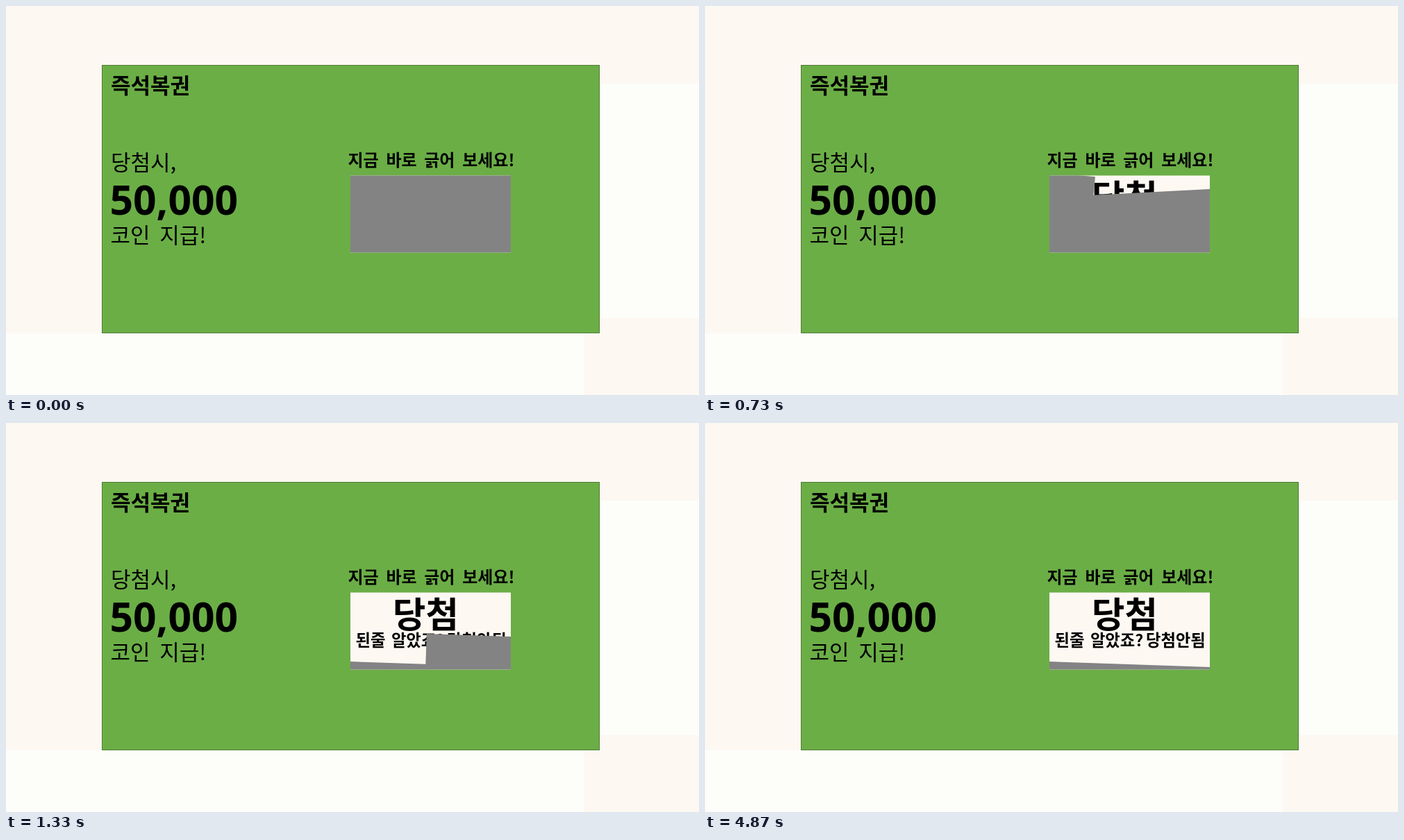
These frames come from a looping animation (998 px wide and 561 px high, 4910 ms). An HTML page:

```html
<!DOCTYPE html>
<html lang="ko">
<head>
<meta charset="utf-8">
<title>즉석복권</title>
<style>
  html, body { margin: 0; width: 100%; height: 100%; overflow: hidden; background: #fdf8f2; }
  svg { display: block; width: 100%; height: 100%; }
  text { font-family: "Noto Sans CJK KR", "Noto Sans CJK", sans-serif; fill: #000; }
  .bold { font-weight: 700; }
  .amount { font-family: "Open Sans", "Noto Sans", sans-serif; font-weight: 700; }
</style>
</head>
<body>
<svg viewBox="0 0 998 561">
  <defs>
    <clipPath id="panel"><rect x="496" y="244.4" width="231" height="111"/></clipPath>
  </defs>

  <rect width="998" height="561" fill="#fdf8f2"/>
  <rect x="855" y="112" width="143" height="338" fill="#fdfefa"/>
  <rect y="472" width="832" height="89" fill="#fdfefa"/>

  <rect x="138.5" y="85.5" width="716" height="386" fill="#6bae46" stroke="#4c7b32"/>
  <text class="bold" x="151" y="126" font-size="31">즉석복권</text>
  <text x="151" y="237" font-size="31">당첨시,</text>
  <text class="amount" x="149.5" y="301" font-size="58.7">50,000</text>
  <text x="150.5" y="341.5" font-size="31" word-spacing="5">코인 지급!</text>
  <text class="bold" x="492.5" y="231" font-size="24" word-spacing="4">지금 바로 긁어 보세요!</text>

  <g clip-path="url(#panel)">
    <rect x="496" y="244" width="231" height="112" fill="#fdf8f2"/>
    <text class="bold" x="557" y="294.5" font-size="51.5">당첨</text>
    <g class="bold" font-size="23.3">
      <text x="503.5" y="321.5" word-spacing="2">된줄 알았죠?</text>
      <text x="635" y="321.5">당첨안됨</text>
    </g>
    <polygon id="foil" fill="#838384"/>
  </g>
</svg>
<script>
  const LOOP = 4910, LEFT = 496, RIGHT = 727, BOTTOM = 356;
  const WIDTH = RIGHT - LEFT;
  const foil = document.getElementById("foil");

  // Upper edge of the foil after each stroke: height at the left and right side.
  const edges = [[244, 244], [240.2, 261.6], [276, 264], [300.4, 308], [344, 352]];
  // Each stroke: start time and direction (1 = rightwards).
  const strokes = [[30, 1], [453, -1], [842, -1], [1178, 1]];
  const END = 1500;

  const slope = ([a, b]) => (b - a) / WIDTH;
  const at = (edge, x) => edge[0] + slope(edge) * (x - LEFT);
  const clampX = x => Math.min(RIGHT, Math.max(LEFT, x));

  function foilPoints(t) {
    let top;
    if (t < strokes[0][0]) {
      top = [[LEFT, edges[0][0]], [RIGHT, edges[0][1]]];
    } else if (t >= END) {
      top = [[LEFT, edges[4][0]], [RIGHT, edges[4][1]]];
    } else {
      const i = strokes.findLastIndex(s => t >= s[0]);
      const [start, dir] = strokes[i];
      const stop = i < 3 ? strokes[i + 1][0] : END;
      const p = (t - start) / (stop - start);
      const before = edges[i], after = edges[i + 1];

      // The front stands square to the old edge.
      const x = dir > 0 ? LEFT + p * WIDTH : RIGHT - p * WIDTH;
      const y = at(before, x);
      const footX = clampX(x - slope(before) * (at(after, x) - y));
      const upper = [x, y], lower = [footX, at(after, footX)];
      top = dir > 0
        ? [[LEFT, after[0]], lower, upper, [RIGHT, before[1]]]
        : [[LEFT, before[0]], upper, lower, [RIGHT, after[1]]];
    }
    return [...top, [RIGHT, BOTTOM], [LEFT, BOTTOM]].join(" ");
  }

  const origin = performance.now();
  function draw(now) {
    const t = Math.max(0, now - origin) % LOOP;
    foil.setAttribute("points", foilPoints(t));
    requestAnimationFrame(draw);
  }
  draw(origin);
</script>
</body>
</html>
```
